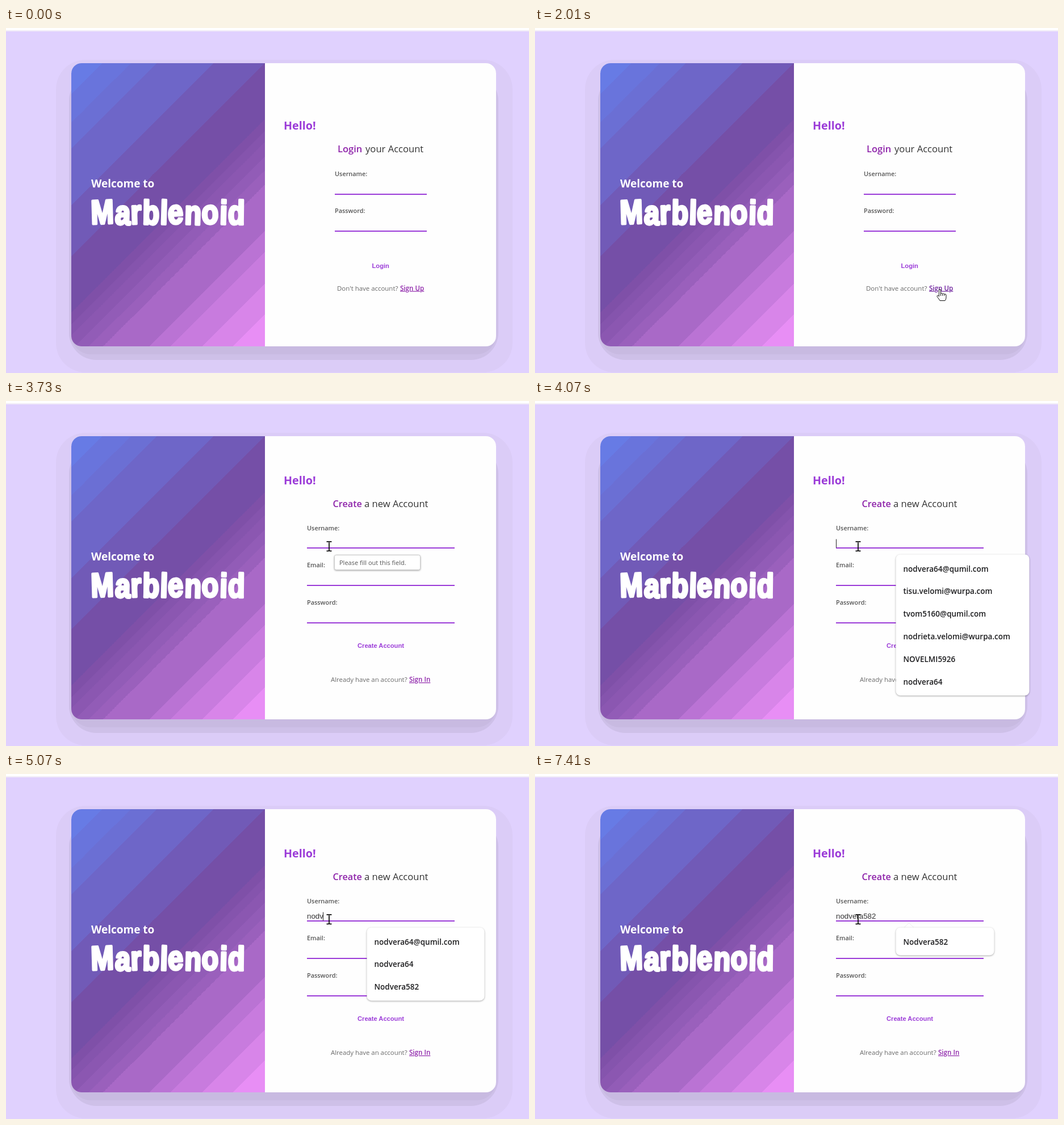
Write an HTML page that moves like this. It is 921 by 608 pixels and loops after 8000 ms.

```html
<!DOCTYPE html>
<html lang="en">
<head>
<meta charset="utf-8">
<title>Login and sign up</title>
<style>
  html, body { margin: 0; width: 100%; height: 100%; overflow: hidden; background: #e0d1fe; }
  svg { display: block; width: 100%; height: 100%; }
  text { font-family: "Open Sans", "Noto Sans", sans-serif; white-space: pre; }
  .semi { font-weight: 600; }
  .bold { font-weight: 700; }
  .arial { font-family: "Liberation Sans", Arial, sans-serif; }
  .brand { letter-spacing: 1.3px; stroke: #fff; stroke-width: 3.6px; stroke-linejoin: round; }
  .popup { filter: drop-shadow(0 1px 1.5px rgba(0, 0, 0, .35)); }
</style>
</head>
<body>
<svg id="stage" viewBox="0 0 921 608" xmlns="http://www.w3.org/2000/svg"></svg>
<script>
const LOOP = 8000;
const PURPLE = '#9b3bd8', LINK = '#8e24aa', HOVER = '#6a1b9a';
const TYPED = 'nodvera582';
const SAVED = [
  'nodvera64@qumil.com', 'tisu.velomi@wurpa.com', 'tvom5160@qumil.com',
  'nodrieta.velomi@wurpa.com', 'NOVELMI5926', 'nodvera64', 'Nodvera582', 'nodo'
];

// Each step lists only what changes from the one before.
const STEPS = [
  { at: 0, page: 'login', cursor: null, hover: false, tip: false, typed: -1, caret: false },
  { at: 660, cursor: ['arrow', 719, 551] },
  { at: 1000, cursor: ['arrow', 728, 475] },
  { at: 1340, cursor: ['arrow', 759, 491] },
  { at: 1670, cursor: ['hand', 711, 462], hover: true },
  { at: 2010, cursor: ['hand', 713, 460] },
  { at: 2340, page: 'register', cursor: ['arrow', 713, 460] },
  { at: 2690, cursor: ['arrow', 620, 333], hover: false },
  { at: 3020, cursor: ['beam', 569, 247] },
  { at: 3730, tip: true },
  { at: 4070, tip: false, typed: 0, caret: true },
  { at: 4400, typed: 2 },
  { at: 4720, typed: 3 },
  { at: 5070, typed: 4 },
  { at: 5410, typed: 7 },
  { at: 6070, typed: 8 },
  { at: 6410, typed: 9 },
  { at: 6740, typed: 10 },
  { at: 7410, caret: false }
];
const states = [];
STEPS.forEach((step, i) => states.push({ ...states[i - 1], ...step }));

const text = (x, y, size, fill, str, cls = '', extra = '') =>
  `<text x="${x}" y="${y}" font-size="${size}" fill="${fill}" class="${cls}" ${extra}>${str}</text>`;
const rect = (x, y, w, h, fill, rx = 0, extra = '') =>
  `<rect x="${x}" y="${y}" width="${w}" height="${h}" rx="${rx}" fill="${fill}" ${extra}/>`;
const path = (d, fill, stroke = 'none', extra = '') =>
  `<path d="${d}" fill="${fill}" stroke="${stroke}" ${extra}/>`;

const mix = (a, b, k) => 'rgb(' + a.map((v, i) => Math.round(v + (b[i] - v) * k)) + ')';
function shade(k) {
  const blue = [102, 126, 234], plum = [118, 75, 162], pink = [240, 147, 251];
  return k < .5 ? mix(blue, plum, k * 2) : mix(plum, pink, k * 2 - 1);
}
// Diagonal bands: flat colour between neighbouring edges.
function bands() {
  const edges = [0, 55, 105, 150, 250, 340, 440, 460, 480, 505, 530, 555, 636, 673, 729, 783, 840];
  return edges.slice(1).map((end, i) => {
    const start = edges[i], c = shade((start + end) / 1680);
    return `<stop offset="${start / 840}" stop-color="${c}"/><stop offset="${end / 840}" stop-color="${c}"/>`;
  }).join('');
}

function backdrop() {
  return `<defs>
    <linearGradient id="bands" gradientUnits="userSpaceOnUse" x1="115" y1="62" x2="535" y2="482">${bands()}</linearGradient>
    <clipPath id="card">${rect(115, 62, 748, 499, '#fff', 18)}</clipPath></defs>` +
    rect(0, 0, 921, 608, '#e0d1fe') +
    rect(0, 0, 921, 4, '#fff') + rect(0, 4, 921, 2, '#f0eaf8') +
    rect(88, 56, 804, 551, '#dbccf7', 52) +
    rect(111, 80, 756, 505, '#cec0e8', 48) +
    rect(115, 80, 748, 495, '#c8bae1', 34) +
    `<g clip-path="url(#card)">${rect(115, 62, 748, 499, '#fefefe')}${rect(115, 62, 341, 499, 'url(#bands)')}</g>` +
    text(150, 281, 19, '#fff', 'Welcome to', 'bold') +
    text(0, 0, 48.5, '#fff', 'Marblenoid', 'bold arial brand',
      'transform="translate(150 345.5) scale(1 1.22)" rotate="-2 2 -2 1 2 -3 2 -2 2 1"');
}

const field = (x, y, w, label) =>
  text(x, y, 10.9, '#555', label, 'semi') + rect(x, Math.round(y + 30.7), w, 2, PURPLE);
const link = (x, y, str, hover) =>
  text(x, y, 11.6, hover ? HOVER : LINK, str, 'semi', 'text-decoration="underline"');
const hello = y => text(489, y, 19.7, PURPLE, 'Hello!', 'bold');

function loginPage(s) {
  return hello(179) +
    text(584, 219, 16.5, LINK, 'Login', 'semi') + text(633, 219, 16.6, '#333', 'your Account') +
    field(579, 261, 162, 'Username:') + field(579, 326.3, 162, 'Password:') +
    text(644.5, 423, 11.2, PURPLE, 'Login', 'bold arial') +
    text(583, 462.5, 11.45, '#6a6a6a', "Don't have account?") + link(694, 462.5, 'Sign Up', s.hover);
}

function registerPage(s) {
  return hello(146.5) +
    text(575.5, 186.5, 16.2, LINK, 'Create', 'semi') + text(631, 186.5, 16.6, '#333', 'a new Account') +
    field(530, 227.7, 260, 'Username:') + field(530, 293.3, 260, 'Email:') + field(530, 358.9, 260, 'Password:') +
    text(619, 435, 11.15, PURPLE, 'Create Account', 'bold arial') +
    text(572, 495, 11.4, '#6a6a6a', 'Already have an account?') + link(710, 495, 'Sign In', s.hover);
}

const row = (str, i) => text(648.5, 300.5 + i * 39.9, 13.5, '#1d1d1f', str, 'semi');
const pointer = () => path('M650 270.5L658.5 262.5L667 270.5', '#fff', '#e9e9e9', 'stroke-width=".8"');

function popup(n) {
  // The old list is half gone while the new one is still to come.
  if (n === 8) {
    return rect(635, 270, 208, 56, '#fefefe') +
      path('M635.5 325V278Q635.5 270.5 643 270.5H812', 'none', '#e4e4e4') + pointer() + row(SAVED[0], 0);
  }
  const rows = SAVED.filter(v => v.toLowerCase().startsWith(TYPED.slice(0, n))).slice(0, 6);
  const width = rows.length > 3 ? 235 : rows.length > 1 ? 207 : 173;
  return (n > 8 ? pointer() : '') +
    rect(635.5, 270.5, width, 9.2 + rows.length * 39.9, '#fff', 8, 'class="popup"') + rows.map(row).join('');
}

const CURSORS = {
  arrow: path('M.5 .5V17L4.3 13.4L7 19.4L9.8 18.2L7.2 12.3H12.5Z', '#fff', '#111'),
  hand: path('M-1.5 13V2Q-1.5 .5 0 .5T1.5 2V8Q3.5 6.5 4.7 8.3Q6.8 7 7.8 9Q10.8 8 11 11V15Q11 18 9 20.5H0Q-2 17 -4.8 13.6Q-5.5 11.2 -3.5 11.2Z', '#fff', '#111') +
    path('M1.5 8V12M4.7 8.5V12M7.8 9.2V12', 'none', '#111'),
  beam: path('M-4.5 .9H-1.2L0 1.8L1.2 .9H4.5M-4.5 17.3H-1.2L0 16.4L1.2 17.3H4.5M0 1.5V16.5', 'none', '#111', 'stroke-width="1.8"')
};

function tooltip() {
  return rect(578.5, 271.5, 151, 26, '#fff', 3, 'stroke="#c9c9c9" class="popup"') +
    text(587, 288.5, 11, '#575757', 'Please fill out this field.');
}

const stage = document.getElementById('stage');
stage.innerHTML = backdrop() + '<g id="live"></g>';
const live = document.getElementById('live');

function draw(s) {
  let out = s.page === 'login' ? loginPage(s) : registerPage(s);
  if (s.typed >= 0) {
    out += text(530, 255, 13.333, '#333', TYPED.slice(0, s.typed), 'arial', 'id="entry"') +
      (s.caret ? rect(530, 243.5, 1, 15, '#222', 0, 'id="caret"') : '') + popup(s.typed);
  }
  if (s.tip) out += tooltip();
  if (s.cursor) {
    const [kind, x, y] = s.cursor;
    out += `<g transform="translate(${x} ${y})">${CURSORS[kind]}</g>`;
  }
  live.innerHTML = out;
  const caret = document.getElementById('caret');
  if (caret && s.typed > 0) {
    const end = document.getElementById('entry').getComputedTextLength();
    caret.setAttribute('x', Math.floor(530 + end));
  }
}

let shown = null;
function tick() {
  const t = performance.now() % LOOP;
  const s = states.filter(v => v.at <= t).pop();
  if (s !== shown) draw(shown = s);
  requestAnimationFrame(tick);
}
tick();
</script>
</body>
</html>
```
